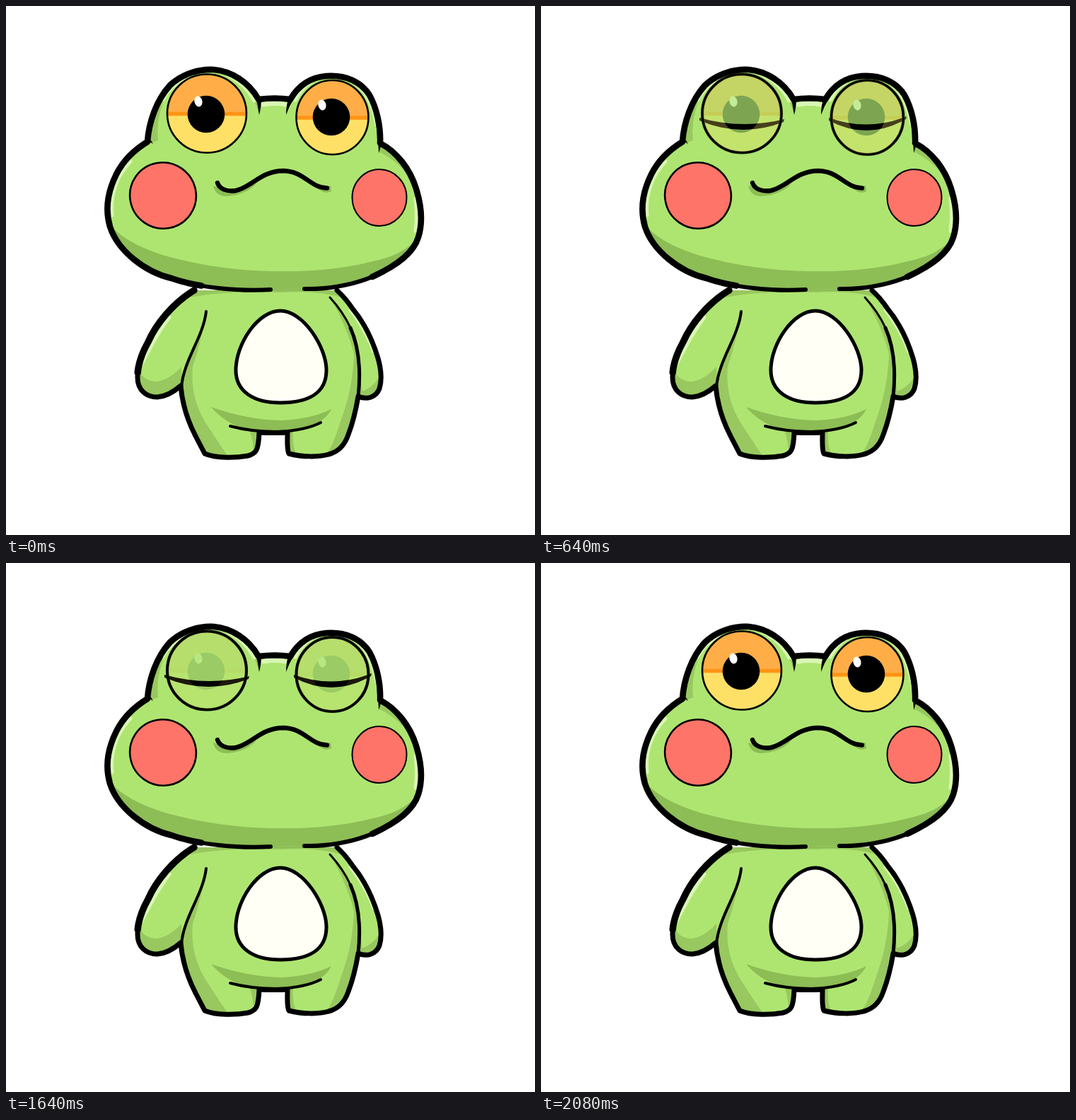
An HTML page for the animation above (2120 ms loop, 748 by 748 pixels).

```html
<!DOCTYPE html>
<html lang="en">
<head>
<meta charset="utf-8">
<title>Blinking frog</title>
<style>
  html, body { margin: 0; width: 100%; height: 100%; overflow: hidden; background: #fff; }
  svg { display: block; width: 100%; height: 100%; }
  .skin { fill: #aee571; }
  .shade { fill: #8dbd55; }
  .soft { fill: #98c85f; }
  .shine { fill: none; stroke: #d9f7b4; stroke-linecap: round; }
  .line { fill: none; stroke: #000; stroke-linecap: round; stroke-linejoin: round; }
  .cheek { fill: #ff7468; stroke: #000; }
</style>
</head>
<body>
<svg viewBox="0 0 748 748">
  <defs>
    <path id="torso" pathLength="100" d="M266 402 C236 420 212 450 201 475 C191 493 186 508 186 525 C186 543 198 553 214 553
      C228 552 239 544 247 537 C249 560 256 585 268 608 L281 633 C298 640 325 639 342 636 C354 633 357 628 358 603
      Q378 604 398 603 C398 618 397 627 400 633 C420 638 442 638 456 634 C472 630 480 618 484 606
      C491 588 495 570 498 552 C510 557 523 554 528 541 C532 528 530 512 526 498 C517 468 505 446 490 428 Q480 413 468 402"/>
    <path id="head" pathLength="100" d="M374 401 C330 404 270 398 234 385 C196 376 158 346 147 312 C140 288 144 262 156 238
      C166 218 182 203 200 192 C202 165 212 134 232 112 C250 95 274 89 294 90 C318 92 343 107 357 132
      Q380 129 402 132 C412 115 428 101 453 99 C480 97 502 107 514 126 C524 144 530 170 529 194
      C552 206 572 230 581 262 C588 286 589 308 583 327 C576 350 552 367 520 382 C490 395 452 401 422 400"/>
    <clipPath id="inTorso"><use href="#torso"/></clipPath>
    <clipPath id="inHead"><use href="#head"/></clipPath>
  </defs>

  <use href="#torso" class="skin"/>
  <g clip-path="url(#inTorso)">
    <path class="soft" d="M250 400 H480 L474 412 Q440 402 390 405 Q300 402 250 414Z"/>
    <path class="soft" d="M186 512 Q195 532 214 531 Q232 528 248 510 L250 560 H180Z"/>
    <path class="soft" d="M283 432 Q276 476 264 510 C261 545 270 572 288 598 Q302 620 316 640 H270 L240 560Z"/>
    <path class="soft" d="M493 470 C492 540 480 566 471 594 Q462 622 450 640 H490 L504 550Z"/>
    <path class="soft" d="M500 545 Q518 543 532 518 V560 H498Z"/>
    <path class="soft" d="M458 412 Q490 446 499 490 L497 520 Q492 470 458 412Z"/>
    <path class="soft" d="M345 602 H362 V640 H350 Q351 620 345 602Z M396 602 H406 Q404 622 412 638 H396Z"/>
    <path class="shine" stroke-width="5" d="M191 508 Q200 490 209 474 T231 440"/>
    <path class="shine" stroke-width="3" d="M486 430 Q508 458 519 489"/>
  </g>
  <path class="shade" d="M290 567 Q340 585 390 586 Q432 584 460 570 Q452 586 430 595 Q380 604 334 597 Q308 588 290 567Z"/>
  <use href="#torso" class="line" stroke-width="7"/>
  <use href="#torso" class="line" stroke-width="9.5" stroke-dasharray="17 100"/>
  <path class="line" stroke-width="4" d="M283 432 C280 460 262 487 254 512 Q249 526 248 540"/>
  <path class="line" stroke-width="3" d="M458 412 Q477 433 487 455"/>
  <path class="line" stroke-width="5" d="M487 455 C499 482 502 515 498 552"/>
  <path class="line" stroke-width="4" d="M317 594 Q346 602 384 602 Q424 600 445 589"/>
  <path fill="#fffff5" stroke="#000" stroke-width="5" d="M388 431 C420 431 453 482 453 515 C453 547 428 561 388 561
    C350 561 325 545 325 515 C325 478 356 431 388 431Z"/>

  <rect class="shade" x="360" y="392" width="76" height="11"/>
  <use href="#head" class="skin"/>
  <g clip-path="url(#inHead)">
    <path class="shade" d="M140 301 C158 327 192 344 232 355 C285 369 335 375 390 375 C455 376 510 365 544 354 Q572 343 592 318 V410 H140Z"/>
    <path class="soft" d="M198 198 Q206 160 222 136 Q212 164 215 190 Q206 193 198 198Z"/>
    <path class="soft" d="M526 196 Q562 212 582 258 Q560 222 527 206Z"/>
    <path class="soft" d="M342 112 Q359 132 358 154 Q352 134 342 112Z"/>
    <path class="shine" stroke-width="5" d="M222 132 Q233 112 252 103 M314 98 Q338 110 351 134"/>
    <path class="shine" stroke-width="7" d="M364 139 Q380 136 396 139"/>
    <path class="shine" stroke-width="5" d="M409 133 Q418 115 432 107 M495 110 Q516 126 524 168"/>
    <path class="shine" stroke-width="5" d="M150 296 Q147 268 160 242 Q168 228 176 220 M579 272 Q582 298 579 318"/>
  </g>
  <use href="#head" class="line" stroke-width="6"/>
  <use href="#head" class="line" stroke-width="8.6" stroke-dasharray="84 100" stroke-dashoffset="-8"/>
  <path d="M353 128 L361 130 Q361 143 358 154 Q356 140 353 128Z M400 129 L407 131 Q400 142 396 154 Q396 140 400 129Z"/>
  <path d="M525 158 L532 192 L527 208 Q526 182 525 158Z M197 188 L205 190 L208 195Z"/>

  <ellipse class="cheek" stroke-width="2.6" cx="222" cy="268" rx="47" ry="46.5" transform="rotate(35 222 268)"/>
  <ellipse class="cheek" stroke-width="2" cx="528" cy="271" rx="38.5" ry="40"/>
  <path class="shade" d="M293 254 Q296 269 312 269 Q340 267 354 251 Q330 262 310 260Z M440 257 Q450 267 460 262 L459 254Z"/>
  <path class="line" stroke-width="6.4" d="M299 250 C302 259 313 263 325 261 C348 256 360 233 393 233 C422 234 430 257 454 257.5"/>

  <g id="eyes"></g>
  <g id="lids"></g>
</svg>
<script>
  const LOOP = 2120, STEP = 40, FADE = 200;
  const eyes = [
    { x: 284, y: 152, rx: 56, ry: 55.5, bar: 152.5, px: 283, py: 153, gx: 272, gy: 135,
      lid: "M224 158 Q284 175 344 160 L343 164 Q284 187 224 162Z" },
    { x: 461.5, y: 157.5, rx: 51, ry: 52.5, bar: 158, px: 460, py: 157, gx: 447, gy: 140,
      lid: "M407 158 Q462 178 517 156 L516 160 Q462 191 407 162Z" }
  ];

  const ring = (e, fill, width) =>
    `<ellipse cx="${e.x}" cy="${e.y}" rx="${e.rx}" ry="${e.ry}" fill="${fill}" stroke="#000" stroke-width="${width}"/>`;

  const openEye = e => {
    const dx = e.rx * Math.sqrt(1 - ((e.bar - e.y) / e.ry) ** 2);
    const l = e.x - dx, r = e.x + dx;
    return ring(e, "#ffe066", 0) +
      `<path d="M${l} ${e.bar}A${e.rx} ${e.ry} 0 0 1 ${r} ${e.bar}Z" fill="#ffae47"/>
       <path d="M${l} ${e.bar}H${r}" stroke="#ff9416" stroke-width="5.5"/>` +
      ring(e, "none", 2.6) +
      `<circle cx="${e.px}" cy="${e.py}" r="26.3"/>
       <ellipse cx="${e.gx}" cy="${e.gy}" rx="5.5" ry="7.5" fill="#fff" transform="rotate(-15 ${e.gx} ${e.gy})"/>`;
  };

  const closedEye = e => ring(e, "#aee571", 4.2) + `<path d="${e.lid}"/>`;

  const lids = document.getElementById("lids");
  document.getElementById("eyes").innerHTML = eyes.map(openEye).join("");
  lids.innerHTML = eyes.map(closedEye).join("");

  const fade = (t, start) => Math.min(1, Math.max(0, (t - start) / FADE));

  // The picture holds for each 40 ms step.
  function draw(now) {
    const t = Math.floor(now % LOOP / STEP) * STEP;
    lids.setAttribute("opacity", fade(t, 182) - fade(t, 584) + fade(t, 1462) - fade(t, 1852));
    requestAnimationFrame(draw);
  }
  draw(performance.now());
</script>
</body>
</html>
```
